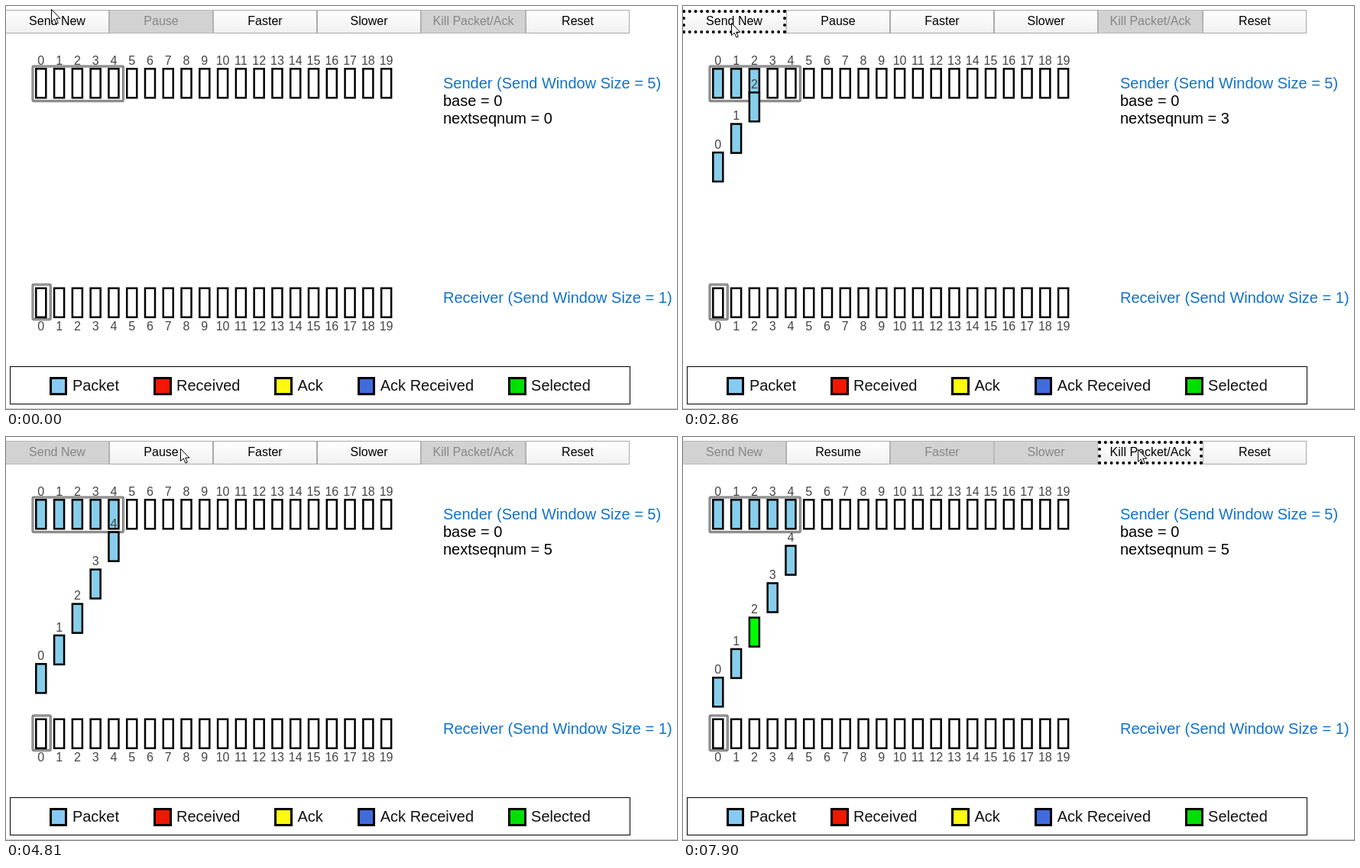
An HTML page with a canvas for the animation above (8000 ms loop, 878x528 px).

```html
<!DOCTYPE html>
<html lang="en">
<head>
<meta charset="utf-8">
<title>Sliding window protocol</title>
<style>
  html, body { margin: 0; width: 878px; height: 528px; overflow: hidden; background: #fff; }
  canvas { position: absolute; left: 0; top: 0; }
  .btn {
    position: absolute; top: 5px; height: 31px; box-sizing: border-box;
    border: 1px solid #aaa;
    background: linear-gradient(#fff, #f0f0f0);
    font: 16px/27px "Liberation Sans", Arial, sans-serif;
    color: #000; text-align: center; white-space: nowrap;
  }
  .btn.off { background: #d2d2d2; border-color: #b8b8b8; color: #868686; }
  .btn.focus { border: 4px dotted #000; line-height: 21px; }
</style>
</head>
<body>
<canvas id="stage" width="878" height="528"></canvas>
<script>
const LOOP = 8000, TICK = 77.5;
const SPEED = 5.27;              // pixels a packet falls per step
const PAUSE_STEP = 53.4;
const SLOTS = 20, WINDOW = 5;
const SKY = '#87ceeb', BLUE = '#1272c9';
const FONT = '"Liberation Sans", Arial, sans-serif';
const ARROW = new Path2D('M0 0V16L3.7 12.6L6.4 18.6L8.8 17.6L6.2 11.7H11.3Z');

// tick at which each thing happens
const AT = { press: 10, pausePress: 65, pause: 67, grab: 85, select: 88, kill: 102 };

// cursor moves between two ticks to a place
const MOVES = [
  { from: 0, to: 5, x: 63, y: 22 },
  { from: 53, to: 56, x: 210, y: 3 },
  { from: 56, to: 65, x: 229, y: 15 },
  { from: 68, to: 73, x: 123, y: 219 },
  { from: 73, to: 81, x: 91, y: 264 },
  { from: 88, to: 97, x: 595, y: 16 }
];
const LEGEND = {
  'Packet': '#87cbf2', 'Received': '#f01800', 'Ack': '#fffa10',
  'Ack Received': '#416bdc', 'Selected': '#00e000'
};

const ctx = document.getElementById('stage').getContext('2d');
const edge = i => Math.floor(136.2 * i - 1);
const buttons = ['Send New', 'Pause', 'Faster', 'Slower', 'Kill Packet/Ack', 'Reset'].map((label, i) => {
  const el = document.createElement('div');
  el.textContent = label;
  el.style.left = edge(i) + 'px';
  el.style.width = edge(i + 1) - edge(i) + 'px';
  document.body.prepend(el);
  return el;
});

const slotX = i => 45.8 + 23.78 * i;
const lag = i => 35.5 * i + 1.92 * i * i;   // distance behind the first packet
const easeOut = f => 1 - (1 - f) ** 3;

function text(str, x, y, size, color, align = 'left') {
  ctx.font = size + 'px ' + FONT;
  ctx.textAlign = align;
  ctx.fillStyle = color;
  ctx.fillText(str, x, y);
}

function slot(i, top, fill, labelY) {
  const x = slotX(i);
  ctx.lineWidth = 2.5;
  ctx.strokeStyle = '#000';
  ctx.fillStyle = fill;
  ctx.fillRect(x - 6.5, top + 1.25, 13, 38);
  ctx.strokeRect(x - 6.5, top + 1.25, 13, 38);
  text(i, x, labelY, 16, '#444', 'center');
}

function windowFrame(y, count) {
  ctx.beginPath();
  ctx.roundRect(35, y, 23.78 * count - 0.5, 45.5, 1.5);
  for (const [width, color] of [[3, '#666'], [1, '#bbb']]) {
    ctx.lineWidth = width;
    ctx.strokeStyle = color;
    ctx.stroke();
  }
}

function legend() {
  ctx.lineWidth = 1;
  ctx.strokeStyle = '#000';
  ctx.strokeRect(5.5, 472.5, 811, 49);
  let x = 56.9;
  for (const [label, color] of Object.entries(LEGEND)) {
    const left = Math.round(x), width = Math.round(x + 23.5) - left;
    ctx.fillStyle = '#000';
    ctx.fillRect(left, 486, width, 24);
    ctx.fillStyle = color;
    ctx.fillRect(left + 3, 489, width - 6, 18);
    text(label, x + 30, 504, 20, '#111');
    x += ctx.measureText(label).width + 75;
  }
}

function cursor(k) {
  let x = 59, y = 4;
  for (const m of MOVES.filter(m => k > m.from)) {
    const f = easeOut(Math.min(1, (k - m.from) / (m.to - m.from)));
    x += (m.x - x) * f;
    y += (m.y - y) * f;
  }
  ctx.save();
  ctx.translate(Math.round(x) + 0.5, Math.round(y) + 0.5);
  ctx.fillStyle = '#fff';
  ctx.strokeStyle = '#000';
  ctx.lineWidth = 1;
  ctx.fill(ARROW);
  ctx.stroke(ARROW);
  ctx.restore();
}

function focused(k, sent) {
  if (k >= AT.kill) return 4;
  if (k >= AT.pausePress) return k < AT.grab ? 1 : -1;
  return k >= AT.press && sent < WINDOW ? 0 : -1;
}

function drawButtons(k, sent) {
  const paused = k >= AT.pause;
  const enabled = [sent < WINDOW, sent > 0, !paused, !paused, k >= AT.select, true];
  const focus = focused(k, sent);
  buttons[1].textContent = paused ? 'Resume' : 'Pause';
  buttons.forEach((el, i) => {
    el.className = 'btn' + (enabled[i] ? '' : ' off') + (i === focus ? ' focus' : '');
  });
}

function draw(t) {
  // every fifth tick repeats the one before
  let k = Math.floor(t / TICK + 0.16);
  if (k % 5 === 4) k--;
  const step = Math.min(PAUSE_STEP, k - Math.floor((k + 1) / 5));
  const lead = 25.4 + SPEED * (step - 14);
  const drops = Array.from({ length: WINDOW }, (_, i) => lead - lag(i)).filter(d => d > -0.8);
  const sent = drops.length;

  drawButtons(k, sent);
  ctx.clearRect(0, 0, 878, 528);

  windowFrame(79, WINDOW);
  windowFrame(365, 1);
  for (let i = 0; i < SLOTS; i++) {
    slot(i, 81, i < sent ? SKY : '#fff', 77);
    slot(i, 368.5, '#fff', 425);
  }
  drops.forEach((d, i) => slot(i, 81 + d, i === 2 && k >= AT.select ? '#00ff00' : SKY, 77 + d));

  text('Sender (Send Window Size = 5)', 572, 108, 20, BLUE);
  text('base = 0', 572, 131, 20, '#000');
  text('nextseqnum = ' + sent, 572, 154, 20, '#000');
  text('Receiver (Send Window Size = 1)', 572, 389, 20, BLUE);

  legend();
  ctx.fillStyle = '#ccc';
  ctx.fillRect(0, 527, 878, 1);
  cursor(k);
}

function frame() {
  draw(performance.now() % LOOP);
  requestAnimationFrame(frame);
}
frame();
</script>
</body>
</html>
```
